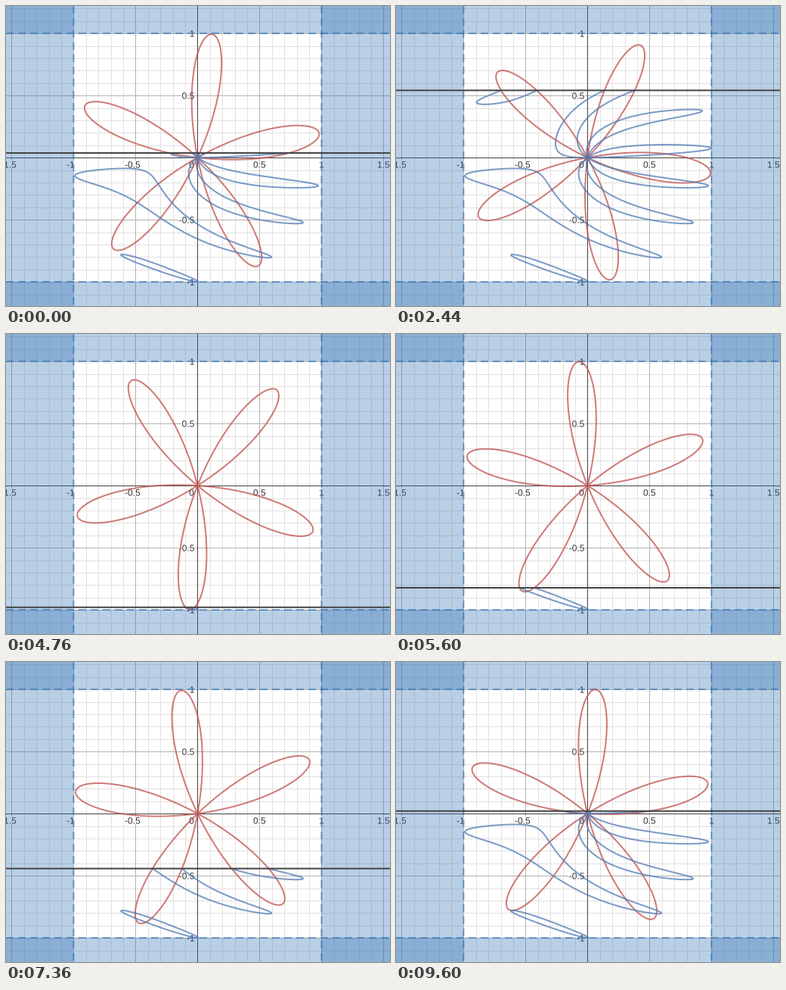
A matplotlib script for the animation above (9680 ms loop, 508 px wide and 396 px high).

```python
import numpy as np
import matplotlib.pyplot as plt
from matplotlib.animation import FuncAnimation
from matplotlib.patches import Rectangle
from matplotlib.patheffects import withStroke

W, H, DPI = 508, 396, 100
UNIT = 164                  # pixels per graph unit
CX, CY = 253.4, 200.1       # origin in pixels, from the top left
PX = 72 / DPI               # points per pixel
SHADE, RED, BLUE, DARK = "#2d70b3", "#bf4f4b", "#4f7ab5", "#444444"
TICKS, TICK_MS = 242, 40

# The graph redraws in bursts; short, quick ones while little is traced.
BURST_STARTS = [0, 1, 28, 57, 86, 114, 143, 170, 198, 227, 243]
BURST_SIZES = [1, 7, 7, 7, 6, 12, 10, 10, 9, 5]
burst_edges = np.cumsum([0] + BURST_SIZES)
redraw_ticks = np.round(np.interp(np.arange(burst_edges[-1]),
                                  burst_edges, BURST_STARTS))


def slider_at(tick):
    """Steady climb from -1 to 1, then a jump back."""
    shown = redraw_ticks[redraw_ticks <= tick][-1]
    return (2 * shown / TICKS + 1.037) % 2 - 1


def rose_radius(theta, c):
    return np.sin(5 * (theta + np.pi * c))


def to_x(px):
    return (px - CX) / UNIT


def to_y(py):
    return (CY - py) / UNIT


fig = plt.figure(figsize=(W / DPI, H / DPI), dpi=DPI, facecolor="white")
ax = fig.add_axes([0, 0, 1, 1])
ax.axis("off")
left, right, bottom, top = to_x(0), to_x(W), to_y(H), to_y(0)


def draw_grid():
    for k in range(-16, 17):
        if k == 0:
            color, z = DARK, 1.2
        elif k % 5 == 0:
            color, z = "#b4b0b2", 1.1
        else:
            color, z = "#e2e0e1", 1
        ax.plot([k / 10] * 2, [bottom, top], color=color, lw=PX, zorder=z)
        ax.plot([left, right], [k / 10] * 2, color=color, lw=PX, zorder=z)


def label(px, py, text, align="center"):
    ax.text(to_x(px), to_y(py), text, ha=align, va="center_baseline",
            family="Liberation Sans", size=12 * PX, color="#333333", zorder=2,
            path_effects=[withStroke(linewidth=2.5 * PX, foreground="white")])


def draw_labels():
    for v in (-1.5, -1, -.5, .5, 1, 1.5):
        label(CX + v * UNIT - (4 if v < 0 else 0), 209, f"{v:g}")
        if abs(v) <= 1:
            label(249.5, CY - v * UNIT, f"{v:g}", "right")
    label(245.5, 209, "0")


def draw_shading():
    bands = [(left, bottom, -1 - left, top - bottom),
             (1, bottom, right - 1, top - bottom),
             (left, 1, right - left, top - 1),
             (left, bottom, right - left, -1 - bottom)]
    for x, y, w, h in bands:
        ax.add_patch(Rectangle((x, y), w, h, fc=SHADE, ec="none", alpha=.33,
                               zorder=3))
    edge = dict(color=SHADE, alpha=.62, lw=2 * PX, zorder=4, snap=False,
                dashes=(5, 3), dash_capstyle="butt")
    for v in (-1, 1):
        ax.plot([v, v], [top, bottom], **edge)
        ax.plot([left, right], [v, v], **edge)


def draw_trace():
    """Every point where the rose meets the line, over the whole sweep."""
    x, y = np.meshgrid(np.linspace(-1.05, 1.05, 600),
                       np.linspace(-1.05, 1.05, 600))
    gap = np.hypot(x, y) - rose_radius(np.arctan2(y, x), y)
    return ax.contour(x, y, gap, levels=[0], colors=[BLUE], alpha=.75,
                      linewidths=2 * PX, zorder=6)


draw_grid()
draw_labels()
draw_shading()
trace = draw_trace()
rose, = ax.plot([], [], color=RED, alpha=.75, lw=2 * PX, zorder=5)
sweep, = ax.plot([], [], color=DARK, lw=2 * PX, zorder=7, snap=False)
ax.set_xlim(left, right)
ax.set_ylim(bottom, top)
theta = np.linspace(0, np.pi, 600)


def update(tick):
    c = slider_at(tick)
    r = rose_radius(theta, c)
    rose.set_data(r * np.cos(theta), r * np.sin(theta))
    sweep.set_data([left, right], [c, c])
    trace.set_clip_path(Rectangle((left, bottom), right - left, c - bottom,
                                  transform=ax.transData))
    return rose, sweep, trace


anim = FuncAnimation(fig, update, frames=TICKS, interval=TICK_MS,
                     init_func=lambda: update(0), repeat=True, repeat_delay=0)
plt.show()
```
